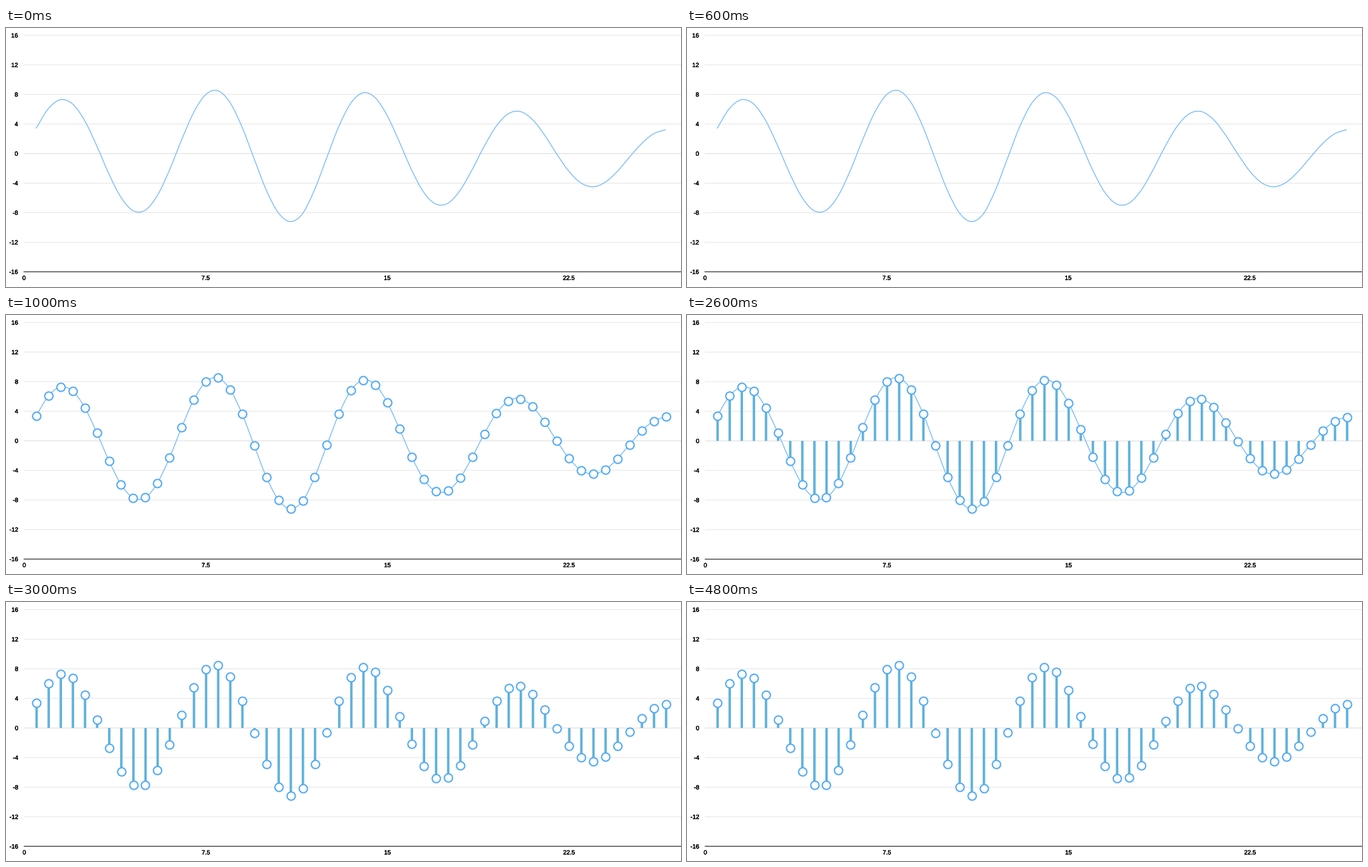
Write a matplotlib script that moves like this. It is 1000x385 px and loops after 6000 ms.

```python
import matplotlib.pyplot as plt
import numpy as np
from matplotlib.animation import FuncAnimation
from matplotlib.patches import PathPatch
from matplotlib.path import Path
from matplotlib.patheffects import withStroke

W, H, DPI = 1000, 385, 100
PX = 72 / DPI
UNIT_X = 35.87

plt.rcParams["font.family"] = "Liberation Sans"
plt.rcParams["path.snap"] = False

fig = plt.figure(figsize=(W / DPI, H / DPI), dpi=DPI, facecolor="white")
ax = fig.add_axes([0, 0, 1, 1])

# A sine whose amplitude grows slowly, then shrinks twice as fast
t = np.arange(1, 54) / 2
values = np.minimum(7 + 0.2 * t, 13.9 - 0.4 * t) * np.sin(t)

# Per step: left edge, top and bottom of the plot, and which layers are shown
STEPS = [
    dict(left=26.7, top=10.9, bottom=362.4, layers={"line"}),
    dict(left=27.0, top=11.1, bottom=362.8, layers={"line", "dots"}),
    dict(left=27.1, top=11.2, bottom=363.0, layers={"line", "stems", "dots"}),
    dict(left=27.1, top=11.3, bottom=363.2, layers={"stems", "dots"}),
]


def smooth_path(x, y):
    """Catmull-Rom curve through the points as cubic Bezier segments."""
    p = np.column_stack([x, y])
    q = np.vstack([p[:1], p, p[-1:]])
    tangent = (q[2:] - q[:-2]) / 6
    verts, codes = [p[0]], [Path.MOVETO]
    for i in range(len(p) - 1):
        verts += [p[i] + tangent[i], p[i + 1] - tangent[i + 1], p[i + 1]]
        codes += [Path.CURVE4] * 3
    return Path(verts, codes)


def label(x, y, value, ha):
    ax.text(x, y + 3.2, f"{value:g}", ha=ha, va="baseline", fontsize=9 * PX,
            color="black",
            path_effects=[withStroke(linewidth=0.35 * PX, foreground="black")])


def draw(frame):
    step = STEPS[min(frame, len(STEPS) - 1)]
    left, top, bottom = step["left"], step["top"], step["bottom"]
    layers = step["layers"]

    def to_y(v):
        return top + (16 - v) / 32 * (bottom - top)

    ax.clear()
    ax.set(xlim=(0, W), ylim=(H, 0))
    ax.axis("off")

    for v in range(-16, 17, 4):
        y = to_y(v)
        if v > -16:
            shade = "#dcdcdc" if v == 0 else "#e6e6e6"
            ax.plot([left, W], [y, y], color=shade, lw=PX, zorder=1)
        label(18.1 + left - 27, y, v, "right")
    ax.plot([left, W], [bottom, bottom], color="#4a4a4a", lw=1.4 * PX, zorder=1)
    for v in (0, 7.5, 15, 22.5):
        label(left + v * UNIT_X, bottom + 8.8, v, "center")

    x, y = left + t * UNIT_X, to_y(values)
    if "stems" in layers:
        ax.vlines(x + 0.3, to_y(0), y, color="#60b2dc", lw=3.6 * PX, zorder=2)
    if "line" in layers:
        ax.add_patch(PathPatch(smooth_path(x, y), fill=False, ec="#74b9f7",
                               lw=1.25 * PX, zorder=3))
    if "dots" in layers:
        ax.plot(x, y, "o", ms=12.2 * PX, mfc="white", mec="#4fa8f6",
                mew=1.9 * PX, zorder=4)
    return ax.get_children()


anim = FuncAnimation(fig, draw, frames=6, interval=1000, repeat=True,
                     repeat_delay=0, init_func=lambda: draw(0))
plt.show()
```
